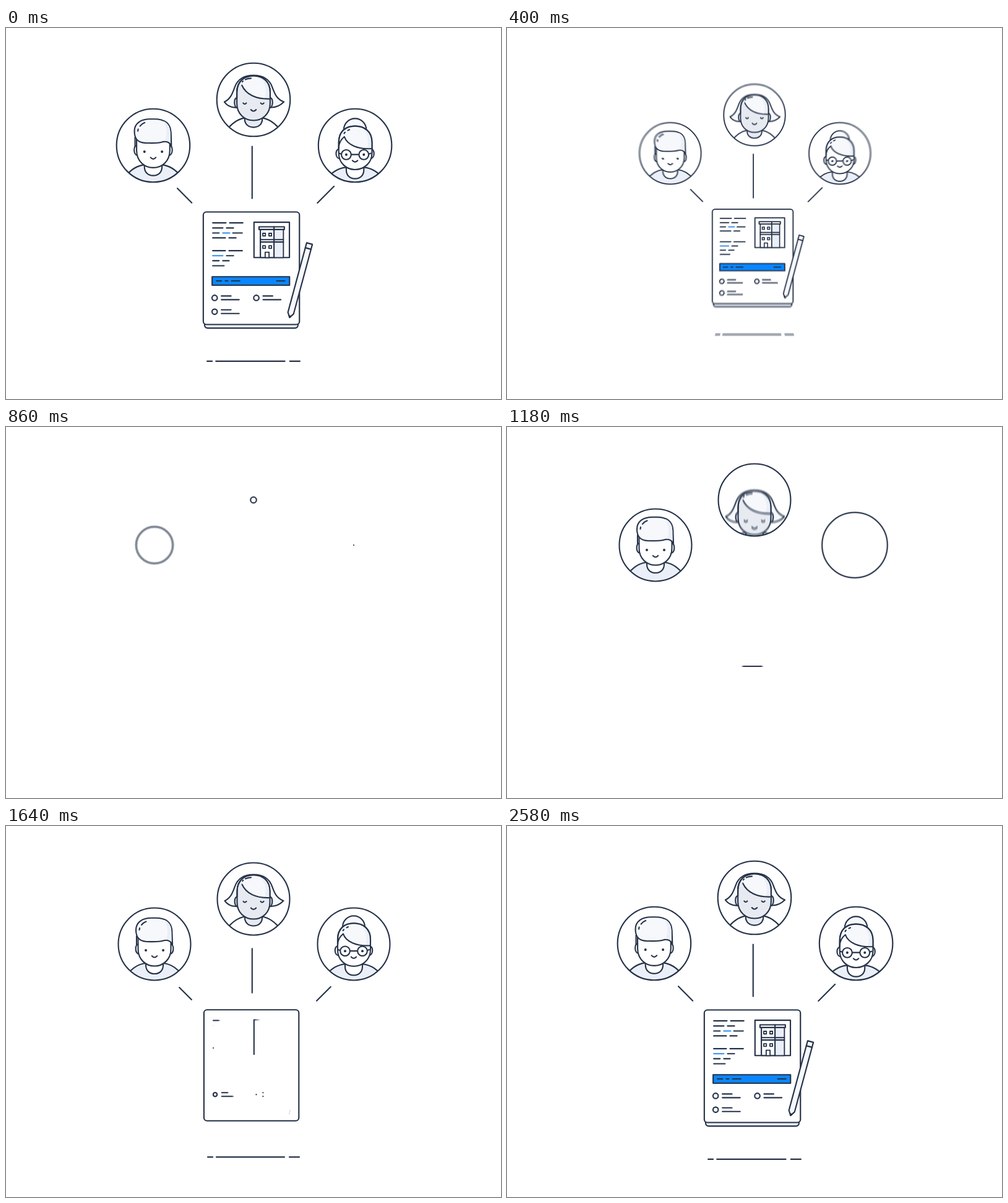
An HTML page with a canvas for the animation above (2.6 s loop, 800x600 px).

```html
<!DOCTYPE html>
<html lang="en">
<head>
<meta charset="utf-8">
<title>Shared document</title>
<style>
  html, body { margin: 0; width: 100%; height: 100%; overflow: hidden; background: #fff; }
  canvas { display: block; width: 800px; height: 600px; }
</style>
</head>
<body>
<canvas id="stage" width="800" height="600"></canvas>
<script>
const LOOP = 2600, SHUTTER = 10, SAMPLES = 8;
const INK = '#253248', BLUE = '#0a86ff', PALE = '#f7f8fc', TINT = '#ebeff7', SKIN = '#e7eaf1';

const view = document.getElementById('stage').getContext('2d');
const layer = document.createElement('canvas');
layer.width = 800;
layer.height = 600;
const c = layer.getContext('2d');

// Easing
const span = (t, start, length) => Math.min(1, Math.max(0, (t - start) / length));
const cubic = x => x < .5 ? 4 * x ** 3 : 1 - 4 * (1 - x) ** 3;
const sine = x => (1 - Math.cos(Math.PI * x)) / 2;
const grow = (t, start, length) => cubic(span(t, start, length));

// Drawing helpers
const cache = {};
const path = d => cache[d] || (cache[d] = new Path2D(d));

function shape(d, fill, outline = true) {
  if (fill) { c.fillStyle = fill; c.fill(path(d)); }
  if (outline) c.stroke(path(d));
}

function disc(x, y, r, fill, outline = true) {
  c.beginPath();
  c.arc(x, y, r, 0, 7);
  if (fill) { c.fillStyle = fill; c.fill(); }
  if (outline) c.stroke();
}

function box(x, y, w, h, r, fill) {
  c.beginPath();
  c.roundRect(x, y, w, h, Math.min(r, w / 2, h / 2));
  c.fillStyle = fill;
  c.fill();
  c.stroke();
}

function line(x1, y1, x2, y2, color = INK) {
  c.strokeStyle = color;
  c.beginPath();
  c.moveTo(x1, y1);
  c.lineTo(x2, y2);
  c.stroke();
  c.strokeStyle = INK;
}

// Horizontal dash growing rightwards; the ends include the round caps
function dash(x1, x2, y, p, color) {
  if (p > 0) line(x1 + 1, y, x1 + 1 + (x2 - x1 - 2) * p, y, color);
}

// People: head and body, then the facial features
const people = [
  {
    x: 240, y: 191, delay: 0,
    body() {
      shape('M196 256V240C204 230 214 223 226 222H254C266 223 276 230 284 240V256Z', TINT);
      shape('M226 219V225C226 234 232 239 240 239S254 234 254 225V219Z', '#fff');
      shape('M214 191C208 191 208 206 215 207M266 191C272 191 272 206 265 207', '#fff');
      shape('M213.5 178V199C213.5 216 226 226.5 240 226.5S266.5 216 266.5 199V178Z', '#fff');
      shape('M211 178V192', null);
      shape('M210 168C210 155 221 148.8 235 148.8H242C259 148.8 267.5 156 268.3 170L269 192C266 185 261 183.5 254 185.5C246 188 236 187 227 187C214 186 210 179 210 168Z', PALE);
      shape('M256 152C263 155 267.2 161 267.3 170V187C264 184 261 183.5 258 184C263 174 262 162 256 152Z', TINT, false);
      shape('M215.5 168L216 165M219 160Q222 156 226.5 154.5', null);
    },
    face() {
      disc(226, 201, 2, INK, false);
      disc(254, 201, 2, INK, false);
      shape('M235.8 210.2Q240 215 244.2 210.2', null);
    }
  },
  {
    x: 400, y: 118, delay: 110,
    body() {
      shape('M400 79C382 79 374 87 370 98C366 109 363 117 353.5 121.5C359 129 366 131.5 376 130H424C434 131.5 441 129 448.5 121.5C437 117 434 109 430 98C426 87 418 79 400 79Z', PALE);
      shape('M356 184V168C364 157 375 149 386 147H414C425 149 436 157 444 168V184Z', '#fff');
      shape('M386 144V149C386 157 392 162 400 162S414 157 414 149V144Z', SKIN);
      shape('M374 115C368 114 368 131 375 131M426 115C432 114 432 131 425 131', SKIN);
      shape('M373.5 106V124C373.5 141 386 151 400 151S426.5 141 426.5 124V106C426.5 89 415 79.8 400 79.8S373.5 89 373.5 106Z', SKIN);
      shape('M381.5 95C388 109.5 404 117.5 426.5 116.5V106C426.5 89 415 79.8 400 79.8C391 79.8 384 83 379.5 88.5Z', PALE, false);
      shape('M411 83C421 87 425.6 95 425.6 106V115.6L418 115.5C422 103 419 91 411 83Z', TINT, false);
      shape('M381.5 95C388 109.5 404 117.5 426.5 116.5', null);
      shape('M373.5 115V106C373.5 89 385 79.8 400 79.8S426.5 89 426.5 106V115', null);
      shape('M382.2 89.5L383.2 88.2M387 85.8Q391 83.8 396 83.8', null);
    },
    face() {
      shape('M383.5 123.2Q386 126.4 388.5 123.2M411.5 123.2Q414 126.4 416.5 123.2', null);
      shape('M395.8 133.8Q400 138.6 404.2 133.8', null);
    }
  },
  {
    x: 562, y: 191, delay: 220,
    body() {
      disc(562, 166, 18, PALE);
      shape('M518 256V243C526 233 536 227 548 226H576C588 227 598 233 606 243V256Z', TINT);
      shape('M548 222V230C548 239 554 244 562 244S576 239 576 230V222Z', '#fff');
      shape('M537 197C530 196 530 211 537 212M587 197C594 196 594 211 587 212', '#fff');
      shape('M536 186V203C536 219 548 229.5 562 229.5S589 219 589 203V186C589 169 578 160 562 160S536 169 536 186Z', '#fff');
      shape('M545 177C549 190 567 197.5 589 196V186C589 169 578 160 562 160C552 160 544 163.5 540 170Z', PALE, false);
      shape('M574 163C584 167 588 175 588 186V195L581 195C585 184 582 171 574 163Z', TINT, false);
      shape('M536 195C536 187 540 181 545 177C549 190 567 197.5 589 196', null);
      shape('M536 196V186C536 169 547 160 562 160S589 169 589 186V196', null);
      shape('M544.6 171.8L546 170M550.5 167L553 165.8', null);
    },
    face() {
      shape('M537 203.5L540 204.5M587 203.5L584 204.5M556 205.5H568', null);
      for (const x of [548, 576]) {
        disc(x, 205.7, 7.8, '#fff');
        disc(x, 205.7, 2, INK, false);
      }
      shape('M557.8 215Q562 219.6 566.2 215', null);
    }
  }
];

const lift = (t, settle) =>
  150 - 155 * grow(t, 738, 519) + 5 * sine(span(t, 1257, settle));

function person(p, time) {
  const t = time - p.delay;
  if (t < 620) return;
  const r = 58.5 * grow(t, 620, 480);
  disc(p.x, p.y, r, '#fff', false);
  c.save();
  c.beginPath();
  c.arc(p.x, p.y, r, 0, 7);
  c.clip();
  const y = lift(t, 343), faceY = lift(t - 10, 400);
  c.translate(0, y);
  p.body();
  c.translate(0, faceY - y);
  p.face();
  c.restore();
  disc(p.x, p.y, r);
}

function connectors(t) {
  const p = grow(t, 1372, 400);
  if (!p) return;
  line(397.8, 234 - 41.5 * p, 397.8, 234 + 41.5 * p);
  line(290 - 11.5 * p, 271 - 11.5 * p, 290 + 11.5 * p, 271 + 11.5 * p);
  line(502, 282.8, 502 + 26.5 * p, 282.8 - 26.5 * p);
}

// Rows of text: y, then pairs of ends; a negative start marks a blue dash
const paragraphs = [
  [1570, [
    [314.5, 334, 357, 361, 384], [322.7, 334, 352, 356, 369],
    [330.7, 334, 346, -350, 363, 366, 383], [338.5, 334, 356, 360, 373]]],
  [1632, [
    [359, 334, 356, 360, 383], [367, -334, 352, 356, 369],
    [375, 334, 346, 350, 362], [383, 334, 354]]]
];

function text(t) {
  for (const [start, rows] of paragraphs)
    rows.forEach(([y, ...ends], i) => {
      for (let k = 0; k < ends.length; k += 2)
        dash(Math.abs(ends[k]), ends[k + 1], y,
          grow(t, start + i * 75 + k * 40, 150), ends[k] < 0 ? '#2b8df2' : INK);
    });
}

function bullets(t) {
  [[338, 434.3, 1520], [404.5, 434.3, 1605], [338, 456.4, 1690]].forEach(([x, y, start]) => {
    if (t < start) return;
    disc(x, y, 4.2 * grow(t, start, 200), PALE);
    dash(x + 9.8, x + 27, y - 3, grow(t, start + 12, 200));
    dash(x + 9.8, x + 40, y + 2.9, grow(t, start + 12, 200));
  });
}

function bar(t) {
  const p = grow(t, 1660, 300);
  if (!p) return;
  box(334, 400.5, 123.5 * p, 13.6, 0, BLUE);
  [[340, 350], [354, 360], [364, 379], [436, 451]].forEach(([a, b], i) =>
    dash(a, b, 407.2, grow(t, 1790 + i * 30, 160)));
}

function building(t) {
  const hop = Math.sin(Math.PI * span(t, 1880, 360));
  const size = grow(t, 1800, 200) * (1 + .05 * hop);
  if (!size) return;
  c.save();
  c.translate(429.3 + hop, 370 - 12.6 * hop);
  c.rotate(-.055 * hop);
  c.scale(size, size);
  c.translate(-429.3, -370);
  box(411, 325, 36.6, 45, 0, '#fff');
  c.fillStyle = TINT;
  c.fillRect(433.5, 326, 13.2, 43);
  box(408.8, 320.8, 40.4, 4.4, 0, '#fff');
  shape('M411 341.3H447.6M411 345.2H447.6M432.7 321V370', null);
  c.lineWidth = 1.8;
  for (const x of [414.8, 424.6])
    for (const y of [331.2, 351]) box(x, y, 4.2, 4.2, 0, '#fff');
  box(418.6, 361.4, 6.2, 8.6, 0, '#fff');
  c.restore();
}

function picture(t) {
  const p = grow(t, 1461, 440);
  if (!p) return;
  c.save();
  if (p < 1) {
    c.lineCap = 'butt';
    c.setLineDash([226 * p, 300]);
  }
  shape('M400.8 370V313.5H457.3V370Z', null);
  c.restore();
  building(t);
}

function pencil(t) {
  const size = grow(t, 1476, 712);
  if (!size) return;
  c.save();
  c.translate(457.6, 465.6);
  c.rotate(.263);
  c.scale(size, size);
  shape('M0 0L-4.7 -7.2V-122.2H4.7V-7.2Z', PALE);
  shape('M-4.7 -114H4.7', null);
  shape('M0 0L-1.4 -2.4H1.4Z', INK);
  c.restore();
}

function sheet(t) {
  const wide = grow(t, 1078, 280), tall = grow(t, 1260, 340);
  if (!wide) return;
  const drop = grow(t, 1645, 250);
  if (drop) box(322, 440, 149, 37 + 5.6 * drop, 5, TINT);
  box(396.6 - 76.7 * wide, 387 - 89.8 * tall, 153.4 * wide, 179.6 * tall, 5, '#fff');
  text(t);
  picture(t);
  bar(t);
  bullets(t);
  pencil(t);
}

function ground(t) {
  const p = grow(t, 1340, 260);
  if (!p) return;
  for (const [a, b] of [[326, 334], [340, 450], [458, 474]])
    line(400 + (a - 400) * p, 535.4, 400 + (b - 400) * p, 535.4);
}

function scene(t, scale) {
  c.save();
  c.translate(400, 270);
  c.scale(scale, scale);
  c.translate(-400, -270);
  c.strokeStyle = INK;
  c.lineWidth = 2.1;
  c.lineCap = c.lineJoin = 'round';
  people.forEach(p => person(p, t));
  connectors(t);
  ground(t);
  sheet(t);
  c.restore();
}

function draw(time) {
  const t = (time + LOOP) % LOOP;
  c.fillStyle = '#fff';
  c.fillRect(0, 0, 800, 600);
  const shrink = 1.013 * (1 - span(t, 0, 646) ** 3.84);
  if (t < 646 && shrink > .002) scene(LOOP, shrink);
  if (t >= 620) scene(t, 1 + .013 * sine(span(t, 1980, 560)));
}

// Running average of several moments of the shutter gives motion blur
function render(time) {
  for (let i = 0; i < SAMPLES; i++) {
    draw(time + SHUTTER * ((i + .5) / SAMPLES - .5));
    view.globalAlpha = 1 / (i + 1);
    view.drawImage(layer, 0, 0);
  }
}

const began = performance.now();
function tick() {
  render((performance.now() - began) % LOOP);
  requestAnimationFrame(tick);
}
tick();
</script>
</body>
</html>
```
